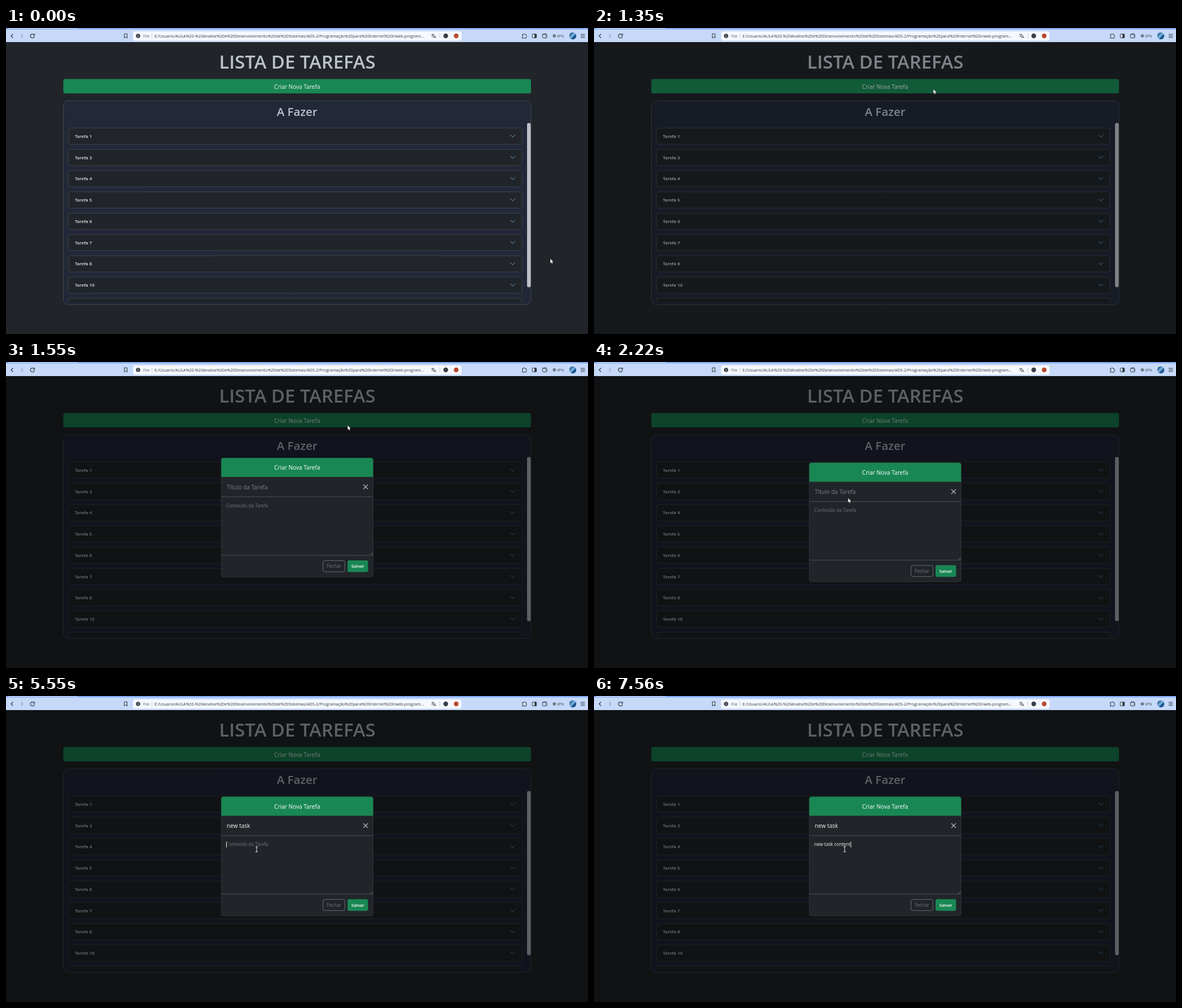
Recreate the animation shown at these times as an HTML page with a canvas. Size 1031 by 543 pixels, loop 8000 ms.

```html
<!DOCTYPE html>
<html lang="pt">
<head>
<meta charset="utf-8">
<title>Lista de Tarefas</title>
<style>
html, body { margin: 0; width: 100%; height: 100%; overflow: hidden; background: #212529; }
canvas { display: block; }
</style>
</head>
<body>
<canvas id="stage" width="1031" height="543"></canvas>
<script>
const ctx = document.getElementById('stage').getContext('2d');
const LOOP = 8000;
const GREEN = '#198754', DARK = '#212529', INK = '#30353d';

// [time, x, y] stops of the pointer
const POINTER = [
  [0, 964, 409], [70, 964, 409], [870, 601, 108], [1350, 601, 108],
  [1550, 605, 112], [1690, 604, 114], [2180, 450, 241],
  [4580, 450, 241], [5080, 444, 272], [LOOP, 444, 272]
];
// Moments at which each character appears
const TITLE = { text: 'new task', times: [2810, 2880, 2950, 3080, 3220, 3290, 4010, 4150] };
const CONTENT = {
  text: 'new task content',
  times: [5620, 5690, 5760, 5960, 6420, 6490, 6620, 6690, 6890, 6950, 7090, 7170, 7250, 7340, 7420, 7560]
};

const clamp = v => Math.max(0, Math.min(1, v));
const smooth = v => v * v * (3 - 2 * v);

function box(x, y, w, h, r, fill, stroke, width = 0.8) {
  ctx.beginPath();
  ctx.roundRect(x, y, w, h, r);
  if (fill) { ctx.fillStyle = fill; ctx.fill(); }
  if (stroke) { ctx.strokeStyle = stroke; ctx.lineWidth = width; ctx.stroke(); }
}

function label(str, x, y, size, color, weight = 400, align = 'left') {
  ctx.font = `${weight} ${size}px "Open Sans", "Noto Sans", sans-serif`;
  ctx.textAlign = align;
  ctx.fillStyle = color;
  ctx.fillText(str, x, y);
}

function path(d, stroke, width = 1, fill) {
  const shape = new Path2D(d);
  if (fill) { ctx.fillStyle = fill; ctx.fill(shape); }
  if (stroke) { ctx.strokeStyle = stroke; ctx.lineWidth = width; ctx.stroke(shape); }
}

function dot(x, y, r, fill) {
  ctx.beginPath();
  ctx.arc(x, y, r, 0, Math.PI * 2);
  ctx.fillStyle = fill;
  ctx.fill();
}

function drawToolbar() {
  box(0, 0, 1031, 25, 0, '#c6d9f9');
  box(0, 0, 1031, 2.5, 0, '#82aaf0');
  box(4, 0, 123, 1.2, 0, '#c6d9f9');
  path('M12.5 10.5L9 14L12.5 17.5', INK, 1.2);
  path('M26.5 10.5L30 14L26.5 17.5', '#94a3bd', 1.2);
  path('M49.4 11.6A3.6 3.6 0 1 0 50.4 14.6M50.6 10V13H47.6', INK, 1.2);
  path('M209.7 10.3H214.5V17.8L212.1 15.8L209.7 17.8Z', INK, 1);

  box(225, 6, 582, 16.5, 4, '#f5f8fe');
  dot(234, 14, 3.8, '#3b414a');
  path('M234 13.5V16M234 11.7V12.6', '#fff', 0.9);
  label('File', 243, 16.8, 7, '#5b626c');
  path('M258.5 9.5V18.5M768.5 9.5V18.5', '#b9c2d0', 0.8);
  label('E:/Usuario/AULA%20-%20Analise%20e%20Desenvolvimento%20de%20Sistemas/ADS-2/Programação%20para%20Internet%20I/web-program...',
    263, 16.8, 7.2, '#353a42');
  path('M753.5 11.5H758.5M756 10.3V11.5M757.7 11.5Q756.7 14.2 753.7 15.5M754.5 12.8Q755.5 14.6 757.2 15.3M757.3 18L759.4 13L761.5 18M758.1 16.4H760.7', INK, 0.8);
  dot(779, 14, 4.2, '#3b3f49');
  dot(797.5, 14, 4.2, '#b8492f');

  path('M914.5 11.5H916.6A1.3 1.3 0 0 1 919.2 11.5H921.3V13.4A1.3 1.3 0 0 1 921.3 16V18H914.5V16A1.3 1.3 0 0 0 914.5 13.4Z', INK, 1);
  box(932.3, 10.7, 7.4, 6.8, 1, null, INK, 1);
  box(936.3, 10.7, 3.4, 6.8, 0, INK);
  box(950.5, 11.2, 7.5, 6.4, 1, null, INK, 1);
  path('M950.5 11L956.5 10V11M955 14.3H958', INK, 0.9);
  dot(971.3, 14, 2.7, '#596270');
  path('M969.8 14H972.8', '#c6d9f9', 0.8);
  label('VPN', 976, 16.5, 6.5, '#444b56');
  const sky = ctx.createLinearGradient(999, 9, 1009, 19);
  sky.addColorStop(0, '#164a86');
  sky.addColorStop(0.5, '#83bbdf');
  sky.addColorStop(0.65, '#1f609c');
  sky.addColorStop(1, '#143c70');
  dot(1004, 14, 6.2, sky);
  path('M1018 11.2H1025.5M1018 14H1025.5M1018 16.8H1025.5', INK, 1);
}

function drawPage() {
  box(0, 0, 1031, 543, 0, DARK);
  label('LISTA DE TAREFAS', 516, 71.8, 32.8, '#bcc2cb', 600, 'center');
  box(101.5, 90.5, 828.5, 25.5, 3.5, GREEN);
  label('Criar Nova Tarefa', 515.7, 107.6, 10.1, '#f2f6f4', 400, 'center');
  box(101.5, 129.3, 828.3, 361.5, 9, '#222838', '#495261');
  label('A Fazer', 515.7, 155.6, 20.4, '#bcc2cb', 600, 'center');

  ctx.save();
  ctx.beginPath();
  ctx.rect(102, 168, 828, 319.5);
  ctx.clip();
  [1, 3, 4, 5, 6, 7, 8, 10, 11].forEach((number, i) => {
    const y = 177.5 + i * 37.77;
    box(110.8, y, 803.2, 28.8, 3, DARK, '#454b53');
    label('Tarefa ' + number, 122, y + 17.3, 7.9, '#e3e6e9', 600);
    path(`M893.5 ${y + 12}L897.7 ${y + 16.2}L901.9 ${y + 12}`, '#5fa6e4', 1);
  });
  ctx.restore();
  box(923, 168.5, 6.6, 291.5, 3.3, '#bbbfc6');
}

// Typed text of a field, its caret blinking half a second after the last key
function drawField(field, t, x, y, size, hint, hintColor, focusFrom, focusTo) {
  const count = field.times.filter(time => time <= t).length;
  const typed = field.text.slice(0, count);
  label(typed || hint, x, y, size, typed ? '#f4f5f6' : hintColor);
  const since = t - (count ? field.times[count - 1] : focusFrom);
  if (t >= focusFrom && t < focusTo && Math.floor(since / 510) % 2 === 0) {
    const caretX = x + (typed ? ctx.measureText(typed).width : 0) + 0.2;
    box(caretX, y - size * 0.95, 0.8, size * 1.3, 0, '#fff');
  }
}

function drawModal(t) {
  const progress = clamp((t - 1400) / 300);
  ctx.save();
  ctx.globalAlpha = clamp((t - 1400) / 150);
  ctx.translate(0, -27 * Math.pow(1 - progress, 1.65));

  box(381.3, 179, 269, 211, 4, DARK, '#343a40');
  box(381.3, 178.8, 269, 33.8, [4, 4, 0, 0], GREEN);
  label('Criar Nova Tarefa', 515.7, 199.8, 10.1, '#fff', 400, 'center');
  path('M381.5 247.6H650M381.5 351.6H650', '#50565c', 0.9);
  path('M633 226L641 234M641 226L633 234', '#b9bdc1', 1.1);
  path('M645.8 350.6L649.6 346.8M648 350.6L649.6 349', '#858a90', 0.7);

  drawField(TITLE, t, 391, 234.2, 10.1, 'Título da Tarefa', '#7b8085', 1700, 5050);
  drawField(CONTENT, t, 390, 266.2, 8.15, 'Conteúdo da Tarefa', '#70757a', 5050, LOOP);

  box(561.6, 361, 38.8, 19.8, 3, null, '#6c757d', 0.9);
  label('Fechar', 581, 374, 8.2, '#6c757d', 400, 'center');
  box(605, 360.6, 36.4, 20.6, 3, GREEN);
  label('Salvar', 623.2, 374, 7.8, '#fff', 600, 'center');
  ctx.restore();
}

function drawPointer(t) {
  const next = POINTER.findIndex(stop => stop[0] > t);
  const [t0, x0, y0] = POINTER[next - 1], [t1, x1, y1] = POINTER[next];
  const k = smooth((t - t0) / (t1 - t0));
  const y = y0 + (y1 - y0) * k;
  ctx.save();
  ctx.translate(x0 + (x1 - x0) * k, y);
  if (t > 4580 && y > 248) {
    path('M-2 -4.5H2M0 -4.5V4.5M-2 4.5H2', '#e6e8ea', 1);
  } else {
    path('M0 0V9L2 7.2L3.4 10L4.9 9.3L3.5 6.6L6.2 6.4Z', '#15181b', 0.7, '#fff');
  }
  ctx.restore();
}

function frame(now) {
  const t = now % LOOP;
  drawPage();
  box(0, 25, 1031, 518, 0, `rgba(0,0,0,${0.5 * clamp((t - 1253) / 150)})`);
  drawToolbar();
  if (t > 1400) drawModal(t);
  drawPointer(t);
  requestAnimationFrame(frame);
}
requestAnimationFrame(frame);
</script>
</body>
</html>
```
